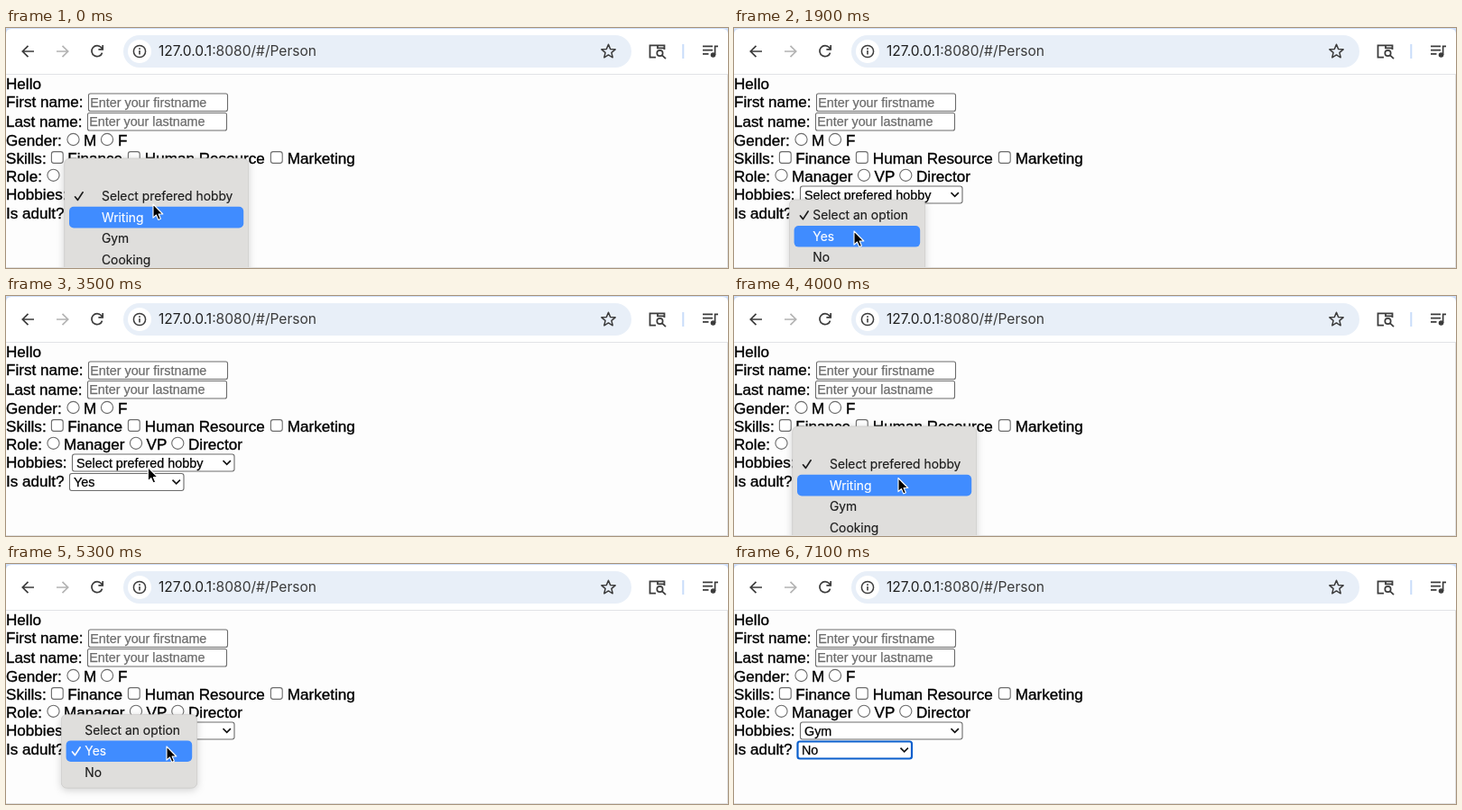
Recreate the animation shown at these times as an HTML page. Size 800 by 267 pixels, loop 7.3 s.

```html
<!DOCTYPE html>
<html lang="en">
<head>
<meta charset="utf-8">
<title>Person form</title>
<style>
  html, body { margin: 0; width: 100%; height: 100%; overflow: hidden; background: #fdfdfd; }
  svg { display: block; width: 100vw; height: 100vh; }
  .page { font: 17.1px "Liberation Sans", Arial, sans-serif; stroke: #000; stroke-width: .35; }
  .field { font: 14.35px "Liberation Sans", Arial, sans-serif; stroke: #000; stroke-width: .25; }
  .hint { fill: #6c6c6c; stroke: #6c6c6c; }
  .box { fill: #fff; stroke: #6c6c6c; stroke-width: 1.1; }
  .line { fill: none; stroke: #3c3c3c; stroke-width: 1.7; }
  .chevron { fill: none; stroke: #111; stroke-width: 1.6; }
  .url { font: 15.55px Inter, Roboto, sans-serif; fill: #3a3a3a; }
  .menu { font: 13.85px Inter, Roboto, sans-serif; fill: #1c1c1c; }
  .menu text { stroke: #1c1c1c; stroke-width: .15; }
  .panel { fill: #dfdedc; stroke: #c4c3c1; stroke-width: .6; filter: drop-shadow(0 2px 4px rgba(0,0,0,.18)); }
  .bar { fill: #408cff; }
  .check { fill: none; stroke: #1c1c1c; stroke-width: 1.7; stroke-linecap: round; stroke-linejoin: round; }
  .menu .hot text { fill: #fff; stroke: #fff; }
  .hot .check { stroke: #fff; }
</style>
</head>
<body>
<svg id="stage" viewBox="0 0 800 267">
  <rect width="800" height="267" fill="#fdfdfd"/>

  <g id="toolbar">
    <rect width="800" height="10" fill="#cfdff9"/>
    <path d="M0 51V7Q0 1 6 1H794Q800 1 800 7V51Z" fill="#fff"/>
    <path d="M0 51.5H800" stroke="#e1e3e6"/>
    <rect x="130" y="8" width="563" height="36" rx="18" fill="#e8eff8"/>
    <circle cx="148" cy="26" r="13" fill="#fff"/>
    <g class="line">
      <path d="M31 26H18.5M24.5 19.8L18.3 26L24.5 32.2"/>
      <path d="M56 26H68.5M62.5 19.8L68.7 26L62.5 32.2" stroke="#b3b3b3"/>
      <path d="M106.6 27.6A6 6 0 1 1 105.6 21.8L107 23.6M107.2 19V23.8H102.4"/>
      <circle cx="148" cy="26" r="6.6" stroke-width="1.5"/>
      <path d="M148 25V29.6M148 22.2V23.9" stroke-width="1.6"/>
      <path id="star" stroke-width="1.5" stroke-linejoin="round"/>
      <path d="M720 32.6H713.5V19.4H729.5V24M722 19.4V22.4H729.5" stroke-width="1.8"/>
      <circle cx="724.5" cy="28" r="3.2"/>
      <path d="M727 30.4L731 34.2"/>
      <path d="M772 20.4H783M772 24.6H783M772 28.8H778.5M785.6 30V20.4H789"/>
    </g>
    <circle cx="783.5" cy="30" r="2.8" fill="#3c3c3c"/>
    <path d="M750.3 18V34" stroke="#c9dcf9" stroke-width="2"/>
    <text class="url" x="169" y="31.4"><tspan fill="#1f1f1f">127.0.0.1</tspan>:8080/#/Person</text>
  </g>

  <g id="form"></g>
  <g id="menus"></g>

  <path d="M0 266.5H800M799.5 52V267" stroke="#e0e0e0" fill="none"/>
  <path id="cursor" d="M0 0V15.2L3.5 12L5.8 17.4L8.4 16.3L6.1 11H10.8Z" fill="#000" stroke="#fff" stroke-width="1.1" stroke-linejoin="round"/>
</svg>

<script>
const LOOP = 7300, STEP = 100, ROW = 23.6;
const FADE = [1, .75, .42, .15];
const form = document.getElementById('form');
const cursor = document.getElementById('cursor');

function add(parent, tag, attrs, text) {
  const el = document.createElementNS('http://www.w3.org/2000/svg', tag);
  for (const key in attrs) el.setAttribute(key, attrs[key]);
  if (text) el.textContent = text;
  parent.append(el);
  return el;
}

const label = (x, y, text) => add(form, 'text', { class: 'page', x, y }, text);
const radio = (cx, cy) => add(form, 'circle', { class: 'box', cx, cy, r: 6.6 });
const box = (x, y, width, height, rx = 2) => add(form, 'rect', { class: 'box', x, y, width, height, rx });

function input(x, y, hint) {
  box(x + .5, y + .5, 154, 19.5);
  add(form, 'text', { class: 'field hint', x: x + 2.2, y: y + 15 }, hint);
}

function select(x, y, width, height) {
  const frame = box(x + .5, y + .5, width - 1, height - 1, 2.5);
  const value = add(form, 'text', { class: 'field', x: x + 5, y: y + 15 });
  add(form, 'path', { class: 'chevron', d: `M${x + width - 13} ${y + 7.6}l4.2 4.2l4.2 -4.2` });
  return { frame, value };
}

label(0, 68, 'Hello');
label(0, 88, 'First name:');
input(91, 72.5, 'Enter your firstname');
label(0, 109.5, 'Last name:');
input(90, 94, 'Enter your lastname');
label(0, 131, 'Gender:');
[[74.5, 'M', 86], [112, 'F', 124]].forEach(([cx, text, x]) => { radio(cx, 124); label(x, 131, text); });
label(0, 150.7, 'Skills:');
[[50, 'Finance', 68.3], [135, 'Human Resource', 153.8], [293, 'Marketing', 311.7]].forEach(([bx, text, x]) => {
  box(bx + .4, 137.6, 12.8, 12.8, 2.6);
  label(x, 150.7, text);
});
label(0, 170.7, 'Role:');
[[52.5, 'Manager', 64], [144, 'VP', 155.5], [190.3, 'Director', 202]].forEach(([cx, text, x]) => {
  radio(cx, 163.8);
  label(x, 170.7, text);
});
label(0, 190.7, 'Hobbies:');
const hobbySelect = select(73, 175.5, 180.5, 20);
label(0, 212.3, 'Is adult?');
const adultSelect = select(70, 197, 127.5, 20);

function menu(x, top, width, height, pad, textX, checkX, items) {
  const g = add(document.getElementById('menus'), 'g', { class: 'menu' });
  add(g, 'rect', { class: 'panel', x, y: 0, width, height, rx: 6 });
  const rows = items.map((text, i) => {
    const row = add(g, 'g', { transform: `translate(0 ${pad + ROW * i})` });
    const bar = add(row, 'rect', { class: 'bar', x: x + 5.3, width: width - 10.8, height: ROW, rx: 5 });
    add(row, 'text', { x: textX, y: 16.9 }, text);
    const check = add(row, 'path', { class: 'check', d: `M${checkX - 4} 12.6l3 3.6l5.6 -8.6` });
    return { row, bar, check };
  });
  return { g, x, top, width, pad, items, rows };
}

const hobby = menu(64.7, 145, 204, 230, 30.2, 106, 80.5, ['Select prefered hobby', 'Writing', 'Gym', 'Cooking']);
const adult = menu(61.3, 191, 150.4, 81.8, 5.4, 87.3, 77.5, ['Select an option', 'Yes', 'No']);

// Each visit: opened, picked, checked row on opening, chosen row (-1 = dismissed)
const visits = [
  { menu: hobby, open: 0, pick: 600, checked: 0, chosen: -1 },
  { menu: adult, open: 1500, pick: 3000, checked: 0, chosen: 1 },
  { menu: hobby, open: 3700, pick: 4500, checked: 0, chosen: 2 },
  { menu: adult, open: 5300, pick: 6000, checked: 1, chosen: 2 }
];
const RING = 6400;

// time, x, y of the pointer tip
const path = [
  [0, 163, 196], [100, 167, 206], [300, 185, 226], [500, 290, 221], [600, 312.5, 214], [900, 312.5, 214],
  [1000, 288, 210], [1400, 135, 203], [1600, 135, 203], [1900, 133, 226], [2300, 128, 245], [2600, 122.5, 238.5],
  [3100, 122.5, 238.5], [3300, 140, 208], [3600, 166, 182], [3700, 168, 183], [4000, 182, 202.5],
  [4200, 178, 222], [4400, 170, 229], [4500, 170, 229], [4700, 166, 212], [5000, 172, 204],
  [5300, 178, 203], [5600, 186, 222], [5800, 145, 226], [LOOP, 145, 226]
];

function pointer(t) {
  const i = path.findIndex(p => p[0] > t);
  const [t0, x0, y0] = path[i - 1], [t1, x1, y1] = path[i];
  const k = (t - t0) / (t1 - t0);
  return [x0 + (x1 - x0) * k, y0 + (y1 - y0) * k];
}

function hotRow(visit, top, t, [x, y]) {
  if (t > visit.pick) return visit.chosen;
  const m = visit.menu;
  // The bar blinks off at the moment of the click
  if (t === visit.pick || x < m.x || x > m.x + m.width) return -1;
  return Math.floor((y + 4 - top - m.pad) / ROW);
}

function value(m, t) {
  const done = visits.filter(v => v.menu === m && v.chosen >= 0 && t >= v.pick + 3 * STEP).pop();
  return m.items[done ? done.chosen : 0];
}

function draw(now) {
  const t = Math.floor(now % LOOP / STEP) * STEP;
  const at = pointer(t);
  cursor.setAttribute('transform', `translate(${at})`);
  cursor.style.display = t < RING ? '' : 'none';

  for (const m of [hobby, adult]) m.g.style.display = 'none';
  const visit = visits.find(v => t >= v.open && t < v.pick + FADE.length * STEP);
  if (visit) {
    const m = visit.menu, top = m.top - ROW * visit.checked;
    const hot = hotRow(visit, top, t, at);
    m.g.style.display = '';
    m.g.style.opacity = FADE[Math.max(0, (t - visit.pick) / STEP)];
    m.g.setAttribute('transform', `translate(0 ${top})`);
    m.rows.forEach(({ row, bar, check }, i) => {
      row.classList.toggle('hot', i === hot);
      bar.style.display = i === hot ? '' : 'none';
      check.style.display = i === visit.checked ? '' : 'none';
    });
  }

  hobbySelect.value.textContent = value(hobby, t);
  adultSelect.value.textContent = value(adult, t);
  adultSelect.frame.style.stroke = t < RING ? '' : '#0b5fcc';
  adultSelect.frame.style.strokeWidth = t < RING ? '' : 2.2;
}

const star = Array.from({ length: 10 }, (_, i) => {
  const r = i % 2 ? 3.6 : 8, a = i * Math.PI / 5 - Math.PI / 2;
  return [667.5 + r * Math.cos(a), 26.3 + r * Math.sin(a)];
});
document.getElementById('star').setAttribute('d', `M${star.join('L')}Z`);

const start = performance.now();
function tick() {
  draw(performance.now() - start);
  requestAnimationFrame(tick);
}
tick();
</script>
</body>
</html>
```
